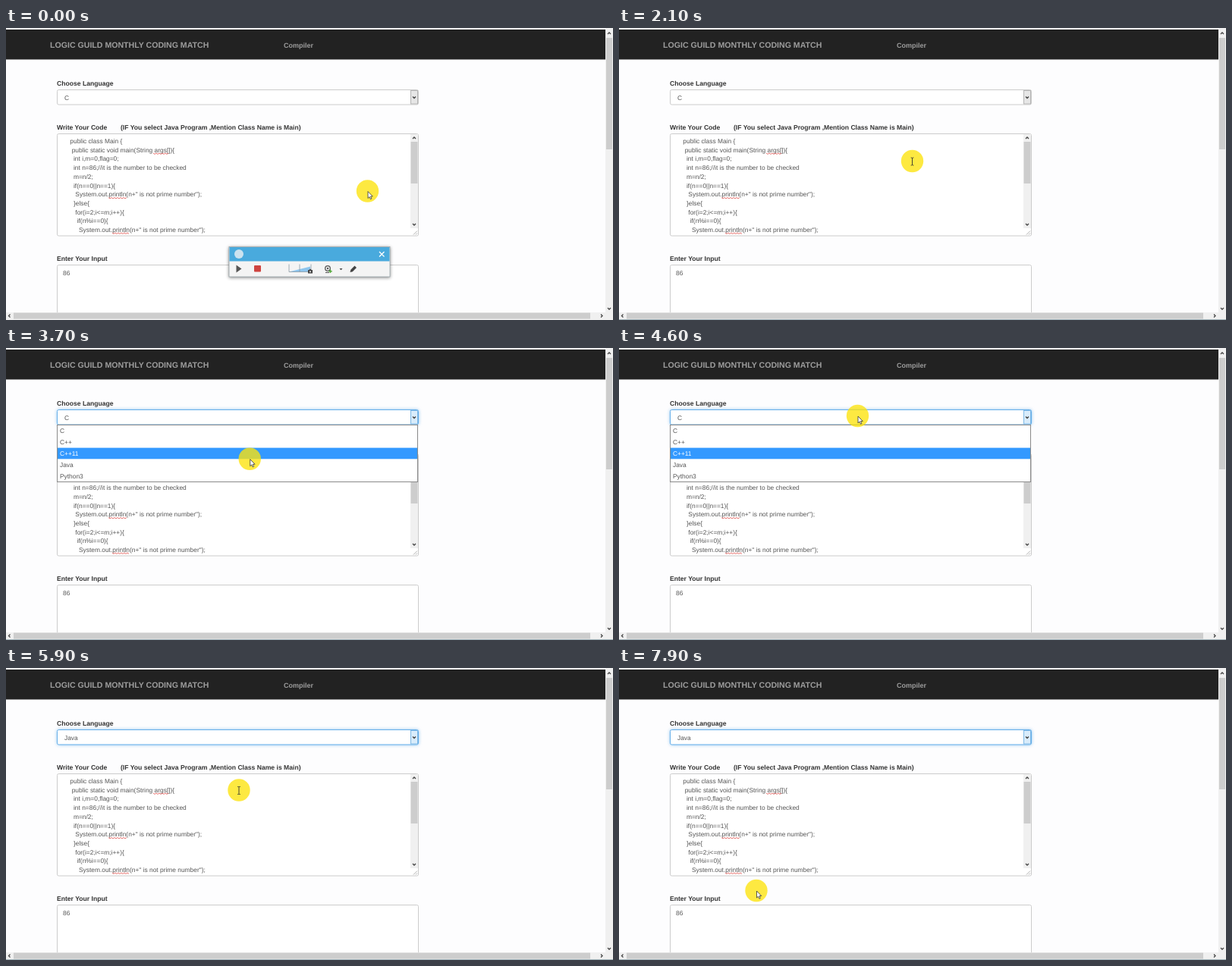
An HTML page for the animation above (8000 ms loop, 800 by 385 pixels).

```html
<!DOCTYPE html>
<html lang="en">
<head>
<meta charset="utf-8">
<title>Online compiler</title>
<style>
  html, body { margin: 0; width: 100%; height: 100%; overflow: hidden; background: #fdfdfe; }
  svg { display: block; width: 800px; height: 385px; }
  text { font: 8.4px "Liberation Sans", Arial, sans-serif; fill: #555; white-space: pre; text-rendering: geometricPrecision; }
  .label { font-size: 8.6px; font-weight: bold; fill: #333; }
  .nav { font-weight: bold; fill: #9d9d9d; }
  .field { fill: #fff; stroke: #ccc; }
  .track { fill: #f0f0f0; }
  .thumb { fill: #cdcdcd; }
  .chevron { fill: none; stroke: #444; stroke-width: 1.3; }
  .squiggle { fill: none; stroke: #e2504c; stroke-width: .8; }
  #select.focus { stroke: #66afe9; filter: drop-shadow(0 0 2px #66afe9aa); }
  #button { fill: #e6e6e6; stroke: #b5b5b5; }
  #button.hot { fill: #d9ecfb; stroke: #7fb9e6; }
</style>
</head>
<body>
<svg viewBox="0 0 800 385">
  <defs>
    <path id="down" class="chevron" d="M-2-1 0 1 2-1"/>
  </defs>

  <!-- Page header -->
  <rect y="2" width="790" height="39.5" fill="#222"/>
  <text class="nav" x="58" y="26" style="font-size:10.6px">LOGIC GUILD MONTHLY CODING MATCH</text>
  <text class="nav" x="366" y="26" style="font-size:9px">Compiler</text>

  <!-- Form -->
  <text class="label" x="67" y="75.5">Choose Language</text>
  <rect id="select" class="field" x="67.5" y="81.5" width="476" height="19.5" rx="2"/>
  <rect id="button" x="533.5" y="82.5" width="9" height="17.5"/>
  <use href="#down" x="538" y="91.5"/>
  <text id="value" x="77" y="94.5"></text>

  <text class="label" x="67" y="133.5">Write Your Code</text>
  <text class="label" x="151" y="133.5">(IF You select Java Program ,Mention Class Name is Main)</text>
  <rect class="field" x="67.5" y="139.5" width="476" height="134.5" rx="2"/>
  <rect class="track" x="533" y="140" width="10" height="124"/>
  <rect class="thumb" x="533.5" y="150" width="9" height="55"/>
  <use href="#down" transform="translate(538 145) scale(1 -1)"/>
  <use href="#down" x="538" y="259"/>
  <path d="M537 272.500l5-5m-2 5l2-2" stroke="#999" stroke-width=".8"/>
  <g id="code"></g>

  <text class="label" x="67" y="306.500">Enter Your Input</text>
  <rect class="field" x="67.5" y="312.500" width="476" height="90" rx="2"/>
  <text x="75" y="325.500">86</text>

  <!-- Window scrollbars -->
  <path class="track" d="M790 0h10v385H0v-10h790z"/>
  <rect class="thumb" x="791" y="13" width="8" height="147"/>
  <rect class="thumb" x="10" y="375.500" width="760" height="8"/>
  <use href="#down" transform="translate(795 7) scale(1 -1)"/>
  <use href="#down" x="795" y="370"/>
  <use href="#down" transform="translate(4.500 379.500) rotate(90)"/>
  <use href="#down" transform="translate(785 379.500) rotate(-90)"/>
  <rect id="edge" y="384" width="800" height="1" fill="#9fb1b8"/>

  <!-- Open list -->
  <g id="list">
    <rect x="67.500" y="101.500" width="475" height="75" fill="#fff" stroke="#8a8a8a"/>
    <rect id="bar" x="68" width="474" height="14.700" fill="#3399ff"/>
  </g>

  <!-- Recorder window -->
  <g id="recorder">
    <rect x="294" y="288.500" width="212" height="39.500" fill="#f4f4f4" stroke="#8d9aa0" stroke-width=".7" style="filter:drop-shadow(0 1px 2px #0007)"/>
    <rect x="294.500" y="289" width="211" height="18.500" fill="#49aadd"/>
    <circle cx="307" cy="298" r="6" fill="#cbe2ef"/>
    <path d="M492 295l6.500 6.500m0-6.500l-6.500 6.500" stroke="#fff" stroke-width="1.300"/>
    <path d="M303.500 312.500v10l7-5z" fill="#555"/>
    <rect x="327" y="313" width="9" height="8.500" rx="1" fill="#cf4440"/>
    <path d="M373 321.500l28-7v7z" fill="#8dc5ee"/>
    <path d="M373 311.500v10h29v-10m-15 0v10" fill="none" stroke="#8b9aa5" stroke-width=".8"/>
    <path d="M398 319h1.500l1-1.300h1l1 1.300h1.500v4.500h-6z" fill="#444"/>
    <circle cx="401" cy="321.200" r="1" fill="#eee"/>
    <circle cx="424" cy="317" r="3.300" fill="#eee" stroke="#555" stroke-width="1.300"/>
    <circle cx="424" cy="317" r="1.200" fill="#555"/>
    <path d="M421 322.500h5" stroke="#555"/>
    <path d="M427.500 318.500v4.500m-2.200-2.200h4.400" stroke="#55aa3c" stroke-width="1.400"/>
    <path d="M439.500 317h4l-2 2.300z" fill="#444"/>
    <path d="M453.500 322l.8-3.200 5.200-5.200 2.500 2.500-5.200 5.200z" fill="#444"/>
  </g>

  <!-- Pointer -->
  <g id="pointer">
    <circle r="14.700" fill="#fce30c" opacity=".78"/>
    <path id="arrow" d="M.5.500v9l2-1.900 1.400 3.100 1.500-.7-1.400-3h2.800z" fill="#fff" stroke="#333" stroke-width=".8"/>
    <path id="beam" d="M-1.800-4.500h1.300l.5.500.5-.5h1.300M0-4v9M-1.800 5.500h1.300l.5-.5.500.5h1.300" fill="none" stroke="#333" stroke-width=".9"/>
  </g>
</svg>
<script>
const LOOP = 8000, STEP = 100, ROW = 14.8;
const $ = id => document.getElementById(id);

function add(parent, tag, attrs, text = "") {
  const el = document.createElementNS("http://www.w3.org/2000/svg", tag);
  for (const key in attrs) el.setAttribute(key, attrs[key]);
  el.textContent = text;
  return parent.appendChild(el);
}

const code = `    public class Main {
     public static void main(String args[]){
      int i,m=0,flag=0;
      int n=86;//it is the number to be checked
      m=n/2;
      if(n==0||n==1){
       System.out.println(n+" is not prime number");
      }else{
       for(i=2;i<=m;i++){
        if(n%i==0){
         System.out.println(n+" is not prime number");`;

code.split("\n").forEach((line, i) => {
  const indent = line.search(/\S/);
  add($("code"), "text", { x: 75 + indent * 2.335, y: 152 + i * 11.7 }, line.trim());
});

// Spell checker underlines: x, y, width
for (const [x, y, width] of [[194, 165, 20], [135, 223.5, 24], [140, 270, 23]]) {
  let d = `M${x} ${y}`;
  for (let k = 1; k <= width / 2; k++) d += `l2 ${k % 2 ? 1.4 : -1.4}`;
  add($("code"), "path", { class: "squiggle", d });
}

const options = ["C", "C++", "C++11", "Java", "Python3"].map((name, i) =>
  add($("list"), "text", { x: 71, y: 112.3 + i * ROW }, name));

// Pointer path: time, x, y
const path = [
  [0, 476.5, 215], [2000, 476.5, 215], [2100, 386.5, 175.5], [2500, 360, 118],
  [2900, 342, 90], [3200, 334, 86], [3300, 328, 103], [3400, 325, 135],
  [3800, 320, 150], [4100, 316, 152], [4200, 315, 139], [4400, 315, 132],
  [4600, 314.5, 89.5], [4700, 314, 75], [4800, 314, 108], [5000, 313, 123],
  [5100, 312, 138], [5300, 309, 153], [5700, 307, 156], [5900, 307, 161],
  [6200, 251, 160], [6800, 163.5, 177], [7000, 164, 177], [7400, 188, 192],
  [7900, 181, 293.5], [8000, 181, 293.5]
];

// Highlighted row: start time, index
const marks = [[3200, 0], [3400, 2], [3800, 3], [4200, 2], [4800, 0], [5000, 1], [5100, 2], [5300, 3]];

function place(t) {
  const i = path.findIndex(p => p[0] > t);
  const [t0, x0, y0] = path[i - 1], [t1, x1, y1] = path[i];
  const k = (t - t0) / (t1 - t0);
  return [x0 + (x1 - x0) * k, y0 + (y1 - y0) * k];
}

function show(el, on) { el.style.display = on ? "" : "none"; }

function draw(now) {
  const t = Math.floor(now % LOOP / STEP) * STEP;
  const [x, y] = place(t);
  const open = t >= 3200 && t < 5800;
  const beam = !open && y > 140 && y < 274 && t >= 2100;

  $("pointer").setAttribute("transform", `translate(${x} ${y})`);
  show($("beam"), beam);
  show($("arrow"), !beam);

  $("recorder").style.opacity = t < 200 ? 1 : Math.max(0, (400 - t) / 300);
  show($("edge"), t >= 200);

  $("select").classList.toggle("focus", t >= 3100);
  $("button").classList.toggle("hot", t >= 2800);
  $("value").textContent = t < 5800 ? "C" : "Java";

  show($("list"), open);
  const mark = marks.filter(m => m[0] <= t).pop();
  const row = mark ? mark[1] : 0;
  $("bar").setAttribute("y", 102 + row * ROW);
  options.forEach((el, i) => el.style.fill = i === row ? "#fff" : "");
}

const start = performance.now();
(function frame() {
  draw(performance.now() - start);
  requestAnimationFrame(frame);
})();
</script>
</body>
</html>
```
